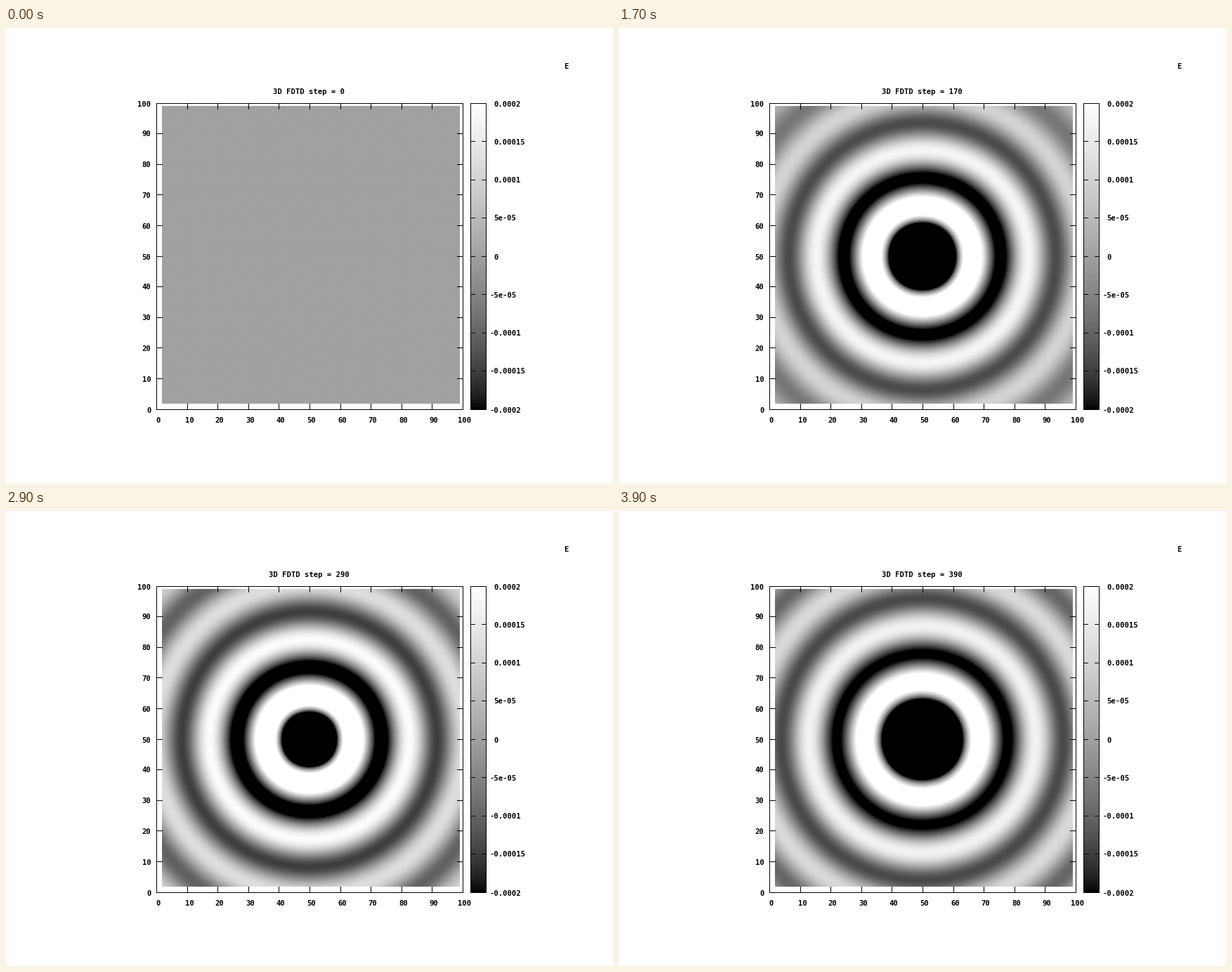
A matplotlib script that plays this animation: 864x648 px, repeating every 4000 ms.

```python
import numpy as np
import matplotlib.pyplot as plt
from matplotlib.animation import FuncAnimation
from matplotlib.colors import ListedColormap
from matplotlib.patches import Rectangle

W, H = 864, 648
FRAMES, INTERVAL, STEPS = 40, 100, 10

LEFT, RIGHT, TOP, BOTTOM = 214, 650, 107, 543   # plot frame
BAR_L, BAR_R = 661, 683                         # colour bar
MAP_L, MAP_R, MAP_T, MAP_B = 222, 646, 111, 535  # field map
LIMIT = 2e-4

# Wave: cells per step, wave number, angular frequency, strength, ramp time
SPEED = 1 / np.sqrt(3)
OMEGA = 2 * np.pi / 30.86
K = OMEGA / SPEED
STRENGTH = 0.0064
RAMP = 57

nodes = np.arange(2, 100) - 50
gx, gy = np.meshgrid(nodes, nodes)
r = np.maximum(np.hypot(gx, gy), 0.7)
kr = K * r
near = 1 - 1 / kr**2 + 1j / kr
amp = STRENGTH * np.abs(near) / r
# The last term is the slight direction dependence of the grid
phase = kr + np.angle(near) + 0.03 * np.cos(4 * np.arctan2(gy, gx))


def field(step):
    """Dipole field on the middle plane with a smooth switch-on."""
    late = np.maximum(step - r / SPEED, 0)
    ramp = 1 - np.exp(-(late / RAMP) ** 2)
    return -amp * ramp * np.sin(phase - 2.201 - OMEGA * (step - 390))


def gray_map(levels):
    g = np.linspace(0, 1, levels) ** (1 / 1.5)
    return ListedColormap(np.column_stack([g, g, g]))


fig = plt.figure(figsize=(W / 72, H / 72), dpi=72, facecolor="white")
ax = fig.add_axes([0, 0, 1, 1])
ax.axis("off")


def label(x, y, text, ha="center"):
    return ax.text(x, y, text, ha=ha, va="center_baseline", fontsize=10.5,
                   family="DejaVu Sans Mono", weight="bold", color="black")


def line(x0, y0, x1, y1):
    """One-pixel line through the centres of the given pixels."""
    ax.plot([x0 + 0.5, x1 + 0.5], [y0 + 0.5, y1 + 0.5], color="black", lw=1,
            zorder=3, solid_capstyle="projecting", snap=False)


def box(x0, y0, x1, y1):
    for x in (x0, x1):
        line(x, y0, x, y1)
    for y in (y0, y1):
        line(x0, y, x1, y)


# Field map, nodes at cell corners
cell = (MAP_R - MAP_L) / 97
image = ax.imshow(field(0), cmap=gray_map(256), vmin=-LIMIT, vmax=LIMIT,
                  origin="lower", aspect="auto", interpolation="bilinear",
                  extent=[MAP_L - cell / 2, MAP_R + cell / 2,
                          MAP_B + cell / 2, MAP_T - cell / 2])
image.set_clip_path(Rectangle((MAP_L, MAP_T), MAP_R - MAP_L, MAP_B - MAP_T,
                              transform=ax.transData))

# Colour bar
ax.imshow(np.linspace(1, 0, 128)[:, None], cmap=gray_map(128), aspect="auto",
          interpolation="nearest", extent=[BAR_L, BAR_R, BOTTOM, TOP])

ax.set_xlim(0, W)
ax.set_ylim(H, 0)

box(LEFT, TOP, RIGHT, BOTTOM)
box(BAR_L, TOP, BAR_R, BOTTOM)

for i in range(11):
    x = round(LEFT + (RIGHT - LEFT) * i / 10)
    y = int(BOTTOM + (TOP - BOTTOM) * i / 10)
    line(x, TOP, x, TOP + 8)
    line(x, BOTTOM, x, BOTTOM - 8)
    line(LEFT, y, LEFT + 8, y)
    line(RIGHT, y, RIGHT - 8, y)
    label(x + 3, 558, str(10 * i))
    label(206.5, y + 0.5, str(10 * i), ha="right")

for i in range(9):
    y = int(BOTTOM + (TOP - BOTTOM) * i / 8)
    line(BAR_L, y, BAR_L + 6, y)
    line(BAR_R, y, BAR_R - 6, y)
    value = (i - 4) * 5e-5
    label(688 if value < 0 else 694, y + 0.5, f"{value:g}", ha="left")

label(797, 54, "E")
title = label(431, 90, "")


def draw(frame):
    step = frame * STEPS
    image.set_data(field(step))
    title.set_text(f"3D FDTD step = {step}")
    return image, title


anim = FuncAnimation(fig, draw, frames=FRAMES, interval=INTERVAL,
                     repeat=True, repeat_delay=0)
plt.show()
```
